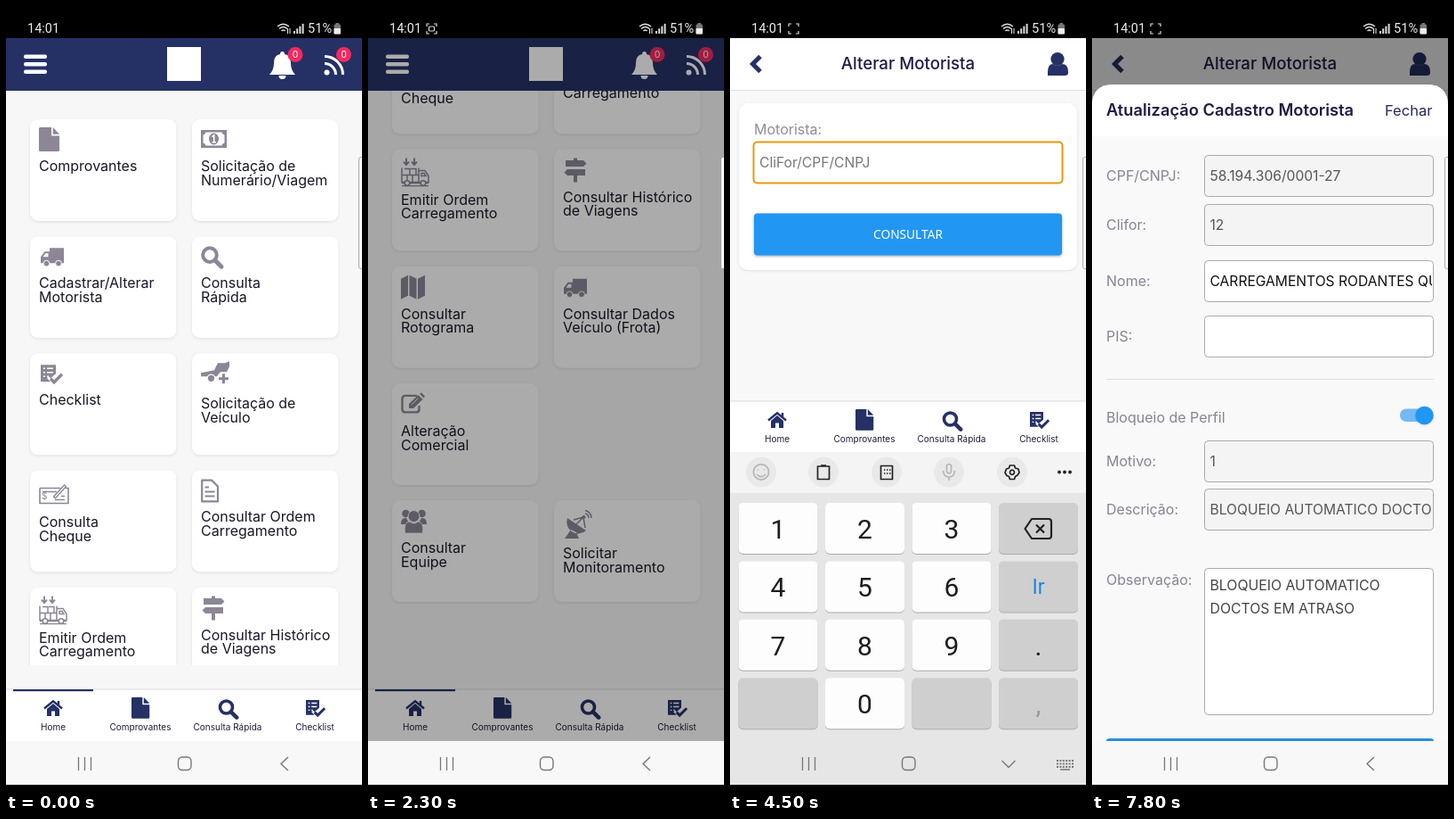
An HTML page that plays this animation: 400x880 px, repeating every 8000 ms.

```html
<!DOCTYPE html>
<html lang="pt-BR">
<head>
<meta charset="utf-8">
<title>Alterar Motorista</title>
<style>
html, body { margin: 0; width: 100%; height: 100%; overflow: hidden; background: #000; }
svg.stage { display: block; width: 100vw; height: 100vh; }
text { font-family: Inter, "Open Sans", sans-serif; white-space: pre; }
.sys { font-family: Roboto, sans-serif; }
.btn { font-family: "Noto Sans", "Open Sans", sans-serif; }
.num { letter-spacing: -.35px; }
.lift { filter: drop-shadow(0 1px 1.5px rgba(0, 0, 0, .1)); }
.key { filter: drop-shadow(0 1px .6px rgba(0, 0, 0, .25)); }
</style>
</head>
<body>
<svg class="stage" id="stage" viewBox="0 0 400 880" preserveAspectRatio="none"></svg>
<script>
const LOOP = 8000, STEP = 100;
const NAVY = '#253165', GREY = '#8c8696', INK = '#191827', BLUE = '#2196f3';

const rect = (x, y, w, h, r, fill, more = '') =>
  `<rect x="${x}" y="${y}" width="${w}" height="${h}" rx="${r}" fill="${fill}" ${more}/>`;
const text = (x, y, str, size, fill, more = '') =>
  `<text x="${x}" y="${y}" font-size="${size}" fill="${fill}" ${more}>${str}</text>`;
const mid = (x, y, str, size, fill, more = '') =>
  text(x, y, str, size, fill, 'text-anchor="middle" ' + more);
const circle = (x, y, r, fill, more = '') =>
  `<circle cx="${x}" cy="${y}" r="${r}" fill="${fill}" ${more}/>`;
const line = (d, color, w, more = '') =>
  `<path d="${d}" fill="none" stroke="${color}" stroke-width="${w}" ${more}/>`;
const group = (id, body, more = '') => `<g id="${id}" ${more}>${body}</g>`;
const CUR = 'currentColor';

const icons = {
  doc: '<path d="M1.5 0H14V9.5H23V25.5Q23 27 21.5 27H1.5Q0 27 0 25.5V1.5Q0 0 1.5 0ZM15.7 0L23 7.7H15.7Z"/>',
  money: '<path fill-rule="evenodd" d="M0 0H29V20H0ZM2.5 5.5V14.5A4 4 0 0 1 5.5 17.5H23.5A4 4 0 0 1 26.5 14.5V5.5A4 4 0 0 1 23.5 2.5H5.5A4 4 0 0 1 2.5 5.5Z"/>' +
    '<ellipse cx="14.5" cy="10" rx="5.5" ry="6.5"/>' + line('M12.5 7.5L14.7 6V13.5M12.5 13.7H17', '#fff', 1.6),
  truck: '<path fill-rule="evenodd" d="M10 0H26V17H0V10L4.5 4H10ZM2.5 10H8.5V6H5.5Z"/>' +
    circle(6.5, 17.5, 3.4, CUR, 'stroke="#fff"') + circle(20, 17.5, 3.4, CUR, 'stroke="#fff"'),
  search: circle(10, 10, 7.8, 'none', `stroke="${CUR}" stroke-width="4"`) + line('M16 16L23 23', CUR, 5, 'stroke-linecap="round"'),
  check: '<path d="M0 0H17V10L11 15L9 13L7 15L11 19H0Z"/>' +
    line('M3 4H5M7 4H14M3 8.5H5M7 8.5H14M3 13H5M7 13H9', '#fff', 1.5) + line('M11 15.5L15 19.5L24 10.5', CUR, 3.4),
  pickup: '<path d="M0 13L15 10L19 2H27L32 0V6L29 12H22Q20 14 18 17H16A5 5 0 0 0 7 17H0Z"/>' + circle(11.5, 19, 3.6, CUR) +
    line('M20 19.5H31M25.5 14V25', CUR, 3),
  cheque: line('M1 5H24M30 5H33V22H1V5M4 9H20M18 18H29M25 14H29', CUR, 1.6) +
    text(3, 18, '$', 10, CUR) + line('M17 16L30 2', CUR, 4) + line('M18 15L29 3', '#fff', 1.2),
  file: line('M1.2 1.2H12L19 8V25H1.2Z', CUR, 2.2, 'stroke-linejoin="round"') + line('M4.5 9H9M4.5 14H15.5M4.5 19H15.5', CUR, 2),
  load: line('M1 11V27H20V11M1 19H20M4 12H10V19M11 12H17V19M7 19V27M13 19V27M20 14H27L31 20V27H20M23 17H26L28 20H23Z', CUR, 1.5) +
    line('M1 31H31M1 28H31', CUR, 1.2) + line('M6 0V7M3 4L6 7.5L9 4M15 0V7M12 4L15 7.5L18 4', CUR, 1.9) +
    [7, 25].map(x => circle(x, 28, 2.8, '#fff', `stroke="${CUR}" stroke-width="1.6"`)).join(''),
  sign: '<path d="M2 2.5H11V0H15V2.5H22L25.5 6L22 9.5H2ZM4 12.5H24V19.5H4L.5 16ZM11 19H15V27H11Z"/>',
  map: '<path d="M0 4L8 0V23L0 27ZM9.5 0L17.5 4V27L9.5 23ZM19 4L27 0V23L19 27Z"/>',
  edit: line('M18 3H5Q1.5 3 1.5 6.5V18Q1.5 21.5 5 21.5H17Q20.5 21.5 20.5 18V14', CUR, 2.4) +
    '<path d="M9 17V12L19.5 2L24.5 7L14 17ZM21 .7L23 -.5L27 3.5L25.5 5.5Z"/>' + line('M12 13L19 6', '#fff', 1),
  users: circle(5.5, 6, 4.3, CUR) + circle(23.5, 6, 4.3, CUR) + '<path d="M0 18Q0 10 6 11L10 18ZM29 18Q29 10 23 11L19 18Z"/>' +
    circle(14.5, 9, 6.5, CUR, 'stroke="#fff"') + '<path d="M4.5 28Q3 15 10 15Q14.5 19 19 15Q26 15 24.5 28Z" stroke="#fff" stroke-width=".8"/>',
  dish: '<path d="M4 8A13 13 0 0 0 25 22ZM8 21L14 24L17 31H1Z"/>' + line('M14 15L22 7M22 7L24 19M11 10L22 7', CUR, 1.5) +
    line('M24 3A5 5 0 0 1 28 8M24 -.5A8.5 8.5 0 0 1 31 8', CUR, 1.4) + circle(22.5, 7, 2, CUR),
  home: '<path d="M3.5 10L10.5 4L17.5 10V18H12.5V12.5H8.5V18H3.5Z"/>' +
    line('M.5 9.5L10.5 1.3L20.5 9.5M16.5 1V6', CUR, 2.4)
};
const icon = (name, x, y, color, k = 1) =>
  `<g transform="translate(${x} ${y}) scale(${k})" fill="${color}" color="${color}">${icons[name]}</g>`;

// column, row, icon, icon offset x/y, text offset, lines
const cards = [
  [0, 0, 'doc', 10, 9, 58, 'Comprovantes'],
  [1, 0, 'money', 10, 12, 58, 'Solicitação de', 'Numerário/Viagem'],
  [0, 1, 'truck', 12, 13, 58, 'Cadastrar/Alterar', 'Motorista'],
  [1, 1, 'search', 10, 11, 58, 'Consulta', 'Rápida'],
  [0, 2, 'check', 12, 13, 58, 'Checklist'],
  [1, 2, 'pickup', 10, 9, 62, 'Solicitação de', 'Veículo'],
  [0, 3, 'cheque', 10, 15, 64, 'Consulta', 'Cheque'],
  [1, 3, 'file', 10, 10, 58, 'Consultar Ordem', 'Carregamento'],
  [0, 4, 'load', 10, 10, 62, 'Emitir Ordem', 'Carregamento'],
  [1, 4, 'sign', 11, 10, 59, 'Consultar Histórico', 'de Viagens'],
  [0, 5, 'map', 10, 10, 59, 'Consultar', 'Rotograma'],
  [1, 5, 'truck', 11, 14, 59, 'Consultar Dados', 'Veículo (Frota)'],
  [0, 6, 'edit', 10, 11, 59, 'Alteração', 'Comercial'],
  [0, 7, 'users', 10, 9, 59, 'Consultar', 'Equipe'],
  [1, 7, 'dish', 11, 12, 65, 'Solicitar', 'Monitoramento']
];
const card = ([col, row, name, ix, iy, ty, ...lines]) => {
  const x = col ? 209 : 27, y = 127 + row * 131.15;
  return rect(x, y, 164.5, 114, 9, '#fff', 'class="lift"') + icon(name, x + ix, y + iy, GREY) +
    lines.map((s, i) => text(x + 10, y + ty + i * 15.7, s, 16, INK)).join('');
};

const badge = x => circle(x, 54.5, 8.5, '#f32b60') + mid(x, 58.3, '0', 10.5, '#fff');
const home = () => rect(0, 36, 400, 788, 0, '#f7f7f8') +
  `<g clip-path="url(#list)">${group('scroll', cards.map(card).join(''))}</g>` +
  rect(0, 36, 400, 59, 0, NAVY) + [54.5, 63, 71.5].map(y => rect(20, y, 26, 4.4, 2, '#fff')).join('') +
  rect(181, 46, 38, 38, 0, '#fff') +
  '<path d="M296 77Q301 72 301 64Q301 55 308 54Q308 51 310.5 51Q313 51 313 54Q320 55 320 64Q320 72 325 77ZM306.5 78H314.5A4 4 0 0 1 306.5 78Z" fill="#fff"/>' +
  circle(360.5, 74.5, 3, '#fff') + line('M358 64.5A12.5 12.5 0 0 1 370.5 77M358 56.5A20.5 20.5 0 0 1 378.5 77', '#fff', 3) +
  badge(325) + badge(379.5);

const page = () => rect(0, 36, 400, 788, 0, '#f8f8f8') + rect(0, 36, 400, 59, 0, '#fff') + rect(0, 94, 400, 1, 0, '#dedede') +
  line('M34 56.5L25.5 65L34 73.5', NAVY, 5) + mid(200, 71, 'Alterar Motorista', 18.7, '#211b45', 'font-weight="500"') +
  '<path d="M357 78V74Q357 65 363 65Q368 69 373 65Q380 65 380 74V75Q380 78 376 78Z" fill="' + NAVY + '"/>' + circle(368, 59.5, 7.6, NAVY) +
  rect(10, 109, 380, 187, 10, '#fff', 'class="lift"') + text(27, 144, 'Motorista:', 16, '#918b98') +
  rect(26.5, 152.5, 347, 46, 4, '#fff', 'id="field"') +
  text(33, 181, 'CliFor/CPF/CNPJ', 15.6, '#777', 'id="hint"') +
  text(33, 181, '58194306000127', 15, '#111', 'id="value" class="num"') +
  rect(0, 165, 1.2, 22, 0, '#111', 'id="caret"') +
  rect(27, 232.5, 346, 47, 4, BLUE, 'style="filter:drop-shadow(0 1.5px 1.5px rgba(0,0,0,.35))"') +
  `<g clip-path="url(#button)">${circle(201, 256, 0, '#fff', 'id="ripple"')}</g>` +
  mid(200, 261, 'CONSULTAR', 13.7, '#fff', 'class="btn"');

const tabs = () => rect(0, 766, 400, 58, 0, '#fff') + rect(0, 765.5, 400, 1, 0, '#dcdcdc') +
  rect(8, 766, 90, 2.2, 0, NAVY, 'id="active"') +
  icon('home', 42.5, 778, NAVY) + icon('doc', 141, 775, NAVY, .88) + icon('search', 238.5, 777, NAVY, .9) + icon('check', 337, 778, NAVY, .88) +
  ['Home', 'Comprovantes', 'Consulta Rápida', 'Checklist'].map((s, i) => mid(53 + i * 98, 811.5, s, 10, '#1d1d35')).join('');

const keyLabels = ['1', '2', '3', '', '4', '5', '6', 'Ir', '7', '8', '9', '.', '', '0', '', ','];
const keyboard = () => {
  const key = (s, i) => {
    const x = 9.5 + (i % 4) * 97.5, y = 557 + Math.floor(i / 4) * 65.4, digit = /\d/.test(s);
    const fill = s === 'Ir' ? '#1785e2' : s === ',' ? '#999' : '#1c1c1c';
    return rect(x, y, 89, 57, 5, digit ? '#fdfdfd' : '#cfcfd0', 'class="key"') +
      mid(x + 44.5, y + (s === 'Ir' ? 37 : 40), s, s === 'Ir' ? 23 : 30, fill, 'class="sys"');
  };
  const tool = (x, c) => line({
    35: 'M30 525Q35 530 40 525M31.5 519.5V520.5M38.5 519.5V520.5M43.5 522.5A8.5 8.5 0 1 1 43.5 522.4',
    105: 'M98.5 516H111.5V530.5H98.5ZM102 515H108',
    176: 'M169.5 515.5H182.5V530.5H169.5ZM173 520H174.5M176 520H177.5M179 520H180.5M173 524H174.5M176 524H177.5M179 524H180.5',
    246: 'M243.5 515Q246 512 248.5 515V522Q246 526 243.5 522ZM239.5 521Q240 528 246 528Q252 528 252.5 521M246 528V532',
    317: 'M314.5 515H319.5L320.5 518L324 519L325 523L323 526L320.5 527.5L319.5 530.5H314.5L313.5 527.5L311 526.5L309 523L310.5 519L313.5 518ZM319.5 522.8A2.5 2.5 0 1 1 319.5 522.7'
  }[x], c, 1.7, 'stroke-linejoin="round"');
  return rect(0, 500, 400, 380, 0, '#e6e6e7') + rect(0, 500, 400, 46, 0, '#f4f4f4') +
    [35, 105, 176, 246, 317].map(x => circle(x, 522.5, 17, '#e9e9e9') + tool(x, x === 35 || x === 246 ? '#b5b5b5' : '#222')).join('') +
    [370, 376, 382].map(x => circle(x, 522.5, 1.9, '#222')).join('') + keyLabels.map(key).join('') +
    line('M339 575H358Q361 575 361 578V594Q361 597 358 597H339L331.5 586ZM344 581.5L353 590.5M353 581.5L344 590.5', '#222', 2.2, 'stroke-linejoin="round"');
};

const popup = () => rect(118, 115, 111, 49.5, 9, '#393939', 'style="filter:drop-shadow(0 1px 2px rgba(0,0,0,.35))"') +
  '<path d="M180 115H220Q229 115 229 124V155.5Q229 164.5 220 164.5H180Z" fill="#222"/>' +
  mid(152, 145, 'Colar', 15, '#fff', 'class="sys"') + [133.5, 139.7, 146].map(y => circle(205, y, 2.1, '#fff')).join('');

// label, top, value, locked
const fields = [
  ['CPF/CNPJ:', 167.5, '58.194.306/0001-27', 1], ['Clifor:', 222.5, '12', 1],
  ['Nome:', 285.5, 'CARREGAMENTOS RODANTES QUILVOR', 0], ['PIS:', 347.5, '', 0],
  ['Motivo:', 487.5, '1', 1], ['Descrição:', 541.5, 'BLOQUEIO AUTOMATICO DOCTOS EM ATRASO', 1]
];
const modal = () => {
  const label = (y, s) => text(16, y, s, 16, '#898295');
  const box = (y, h, locked) => rect(126.5, y, 257, h, 4, locked ? '#f4f4f4' : '#fff', 'stroke="#aaa"');
  return '<path d="M0 824V112Q0 88 24 88H376Q400 88 400 112V824Z" fill="#f9f9f9"/>' +
    '<path d="M0 146V112Q0 88 24 88H376Q400 88 400 112V146Z" fill="#fff"/>' +
    text(16, 123, 'Atualização Cadastro Motorista', 18.3, '#211b45', 'font-weight="600"') + text(329, 122.5, 'Fechar', 16.5, '#2a2a5a') +
    fields.map(([s, y, v, locked]) => label(y + 28.5, s) + box(y, 46, locked) +
      `<svg x="128" y="${y}" width="254" height="46">${text(4.5, 28.5, v, 15.6, locked ? '#555' : '#111')}</svg>`).join('') +
    rect(16, 418, 368, 1, 0, '#dedede') + label(466.5, 'Bloqueio de Perfil') +
    rect(346, 451.5, 36, 14.5, 7.2, '#74b9f4') + circle(373.5, 459, 10.3, BLUE, 'class="lift"') +
    label(649, 'Observação:') + box(630.5, 164, 0) +
    text(132.5, 655, 'BLOQUEIO AUTOMATICO', 15.8, '#444') + text(132.5, 680.5, 'DOCTOS EM ATRASO', 15.8, '#444') +
    '<path d="M16 824Q16 821 20 821H380Q384 821 384 824Z" fill="#2b8fd6"/>';
};

const status = () => rect(0, 0, 400, 36, 0, '#000') + text(24, 30, '14:01', 14.5, '#eee', 'class="sys"') +
  group('rec', line('M66 23V20H69M74 20H77V23M77 28V31H74M69 31H66V28', '#ddd', 1.2) +
    group('lens', rect(68.5, 23, 6, 5, 1, 'none', 'stroke="#ddd" stroke-width="1.2"'))) +
  line('M305 23Q311.5 17.5 318 23M307 25.5Q311.5 21.5 316 25.5M309.5 28Q311.5 26 313.5 28', '#ddd', 1.5) +
  line('M316.5 25V31M319 31V25', '#ddd', 1.1) +
  [0, 1, 2, 3].map(i => rect(323 + i * 3.2, 28 - i * 2.7, 2, 3 + i * 2.7, 0, '#ddd')).join('') +
  text(339, 30.3, '51%', 14.6, '#eee', 'class="sys"') +
  rect(368.5, 20.5, 7.5, 11, 1.2, '#777') + rect(368.5, 25, 7.5, 6.5, 1, '#eee') + rect(370.5, 19, 3.5, 2, 0, '#777');

const nav = () => line('M81.5 842V857M88.5 842V857M95.5 842V857', '#777', 1.3) +
  rect(193.5, 842, 14.5, 14.5, 4.5, 'none', 'stroke="#777" stroke-width="1.4"') +
  line('M317 842L309 849.5L317 857', '#777', 1.4, 'id="back"') +
  group('hide', line('M305.5 846L313 853.5L320.5 846', '#777', 1.4) +
    line('M367 846H386M367 849.5H386M367 853H386', '#777', 1.8, 'stroke-dasharray="2 1.4"') + line('M371 856H382', '#777', 1.5));

const stage = document.getElementById('stage');
stage.innerHTML = '<defs><clipPath id="list"><rect x="0" y="95" width="400" height="644"/></clipPath>' +
  '<clipPath id="button"><rect x="27" y="232.5" width="346" height="47" rx="4"/></clipPath></defs>' +
  home() + group('page', page()) + group('tabs', tabs()) + group('popup', popup()) +
  rect(0, 36, 400, 788, 0, '#000', 'id="dim"') +
  line('M182 465H215', '#8a8a8a', 1.5, 'id="wait" stroke-dasharray="5 2"') + group('modal', modal()) +
  rect(0, 824, 400, 56, 0, '#f8f8f8') + group('keyboard', keyboard()) + nav() +
  '<path d="M401 169.5H398.5Q396.5 169.5 396.5 172V292Q396.5 294.5 398.5 294.5H401Z" fill="#f8f8f8" stroke="#999" stroke-width=".8"/>' +
  status() + rect(0, 873, 400, 7, 0, '#000');

const el = {};
stage.querySelectorAll('[id]').forEach(n => el[n.id] = n);
const set = (id, key, v) => el[id].setAttribute(key, v);
const show = (id, on) => set(id, 'opacity', +on);
const shift = (id, y) => set(id, 'transform', `translate(0 ${y})`);
const clamp = v => Math.max(0, Math.min(1, v));
const out = (t, a, b) => 1 - (1 - clamp((t - a) / (b - a))) ** 3;
const within = (t, a, b) => t >= a && t < b;
const track = (t, keys) => keys.reduce((v, [at, to], i) => {
  if (t < at) return v;
  const next = keys[i + 1];
  return next ? to + (next[1] - to) * clamp((t - at) / (next[0] - at)) : to;
}, keys[0][1]);

function draw(time) {
  const t = Math.floor(time / STEP) * STEP;
  shift('scroll', -491 * out(t, 100, 700));

  const p = out(t, 2600, 3300);
  show('page', p);
  shift('page', 40 * (1 - p));
  show('active', 1 - p);

  const kb = out(t, 3600, 3900) * (1 - out(t, 6200, 6500));
  shift('keyboard', 380 * (1 - kb));
  shift('tabs', -323 * kb);
  show('hide', kb > .5);
  show('back', kb <= .5);

  const focus = within(t, 3700, 6400), pasted = t >= 5500;
  set('field', 'stroke', focus ? '#e59a0c' : '#a5a5a5');
  set('field', 'stroke-width', focus ? 2 : 1);
  show('hint', !pasted);
  show('value', pasted);
  set('caret', 'x', pasted ? 155 : 33);
  show('caret', focus && (within(t, 5500, 6000) || Math.floor((t - 3700) / 500) % 2 === 0));
  show('popup', track(t, [[5100, 0], [5300, 1], [5900, 1], [6100, 0]]));

  set('ripple', 'r', track(t, [[6400, 0], [6600, 126], [6700, 180]]));
  set('ripple', 'opacity', track(t, [[6400, .22], [6700, .22], [6900, 0]]));
  set('dim', 'opacity', track(t, [[1100, 0], [1200, .1], [1500, .38], [2100, .38], [2300, .33],
    [2500, 0], [6400, 0], [6500, .2], [6600, .39], [7100, .39], [7500, .46]]));
  show('wait', within(t, 6600, 7100) * .4);
  shift('modal', 740 * (1 - out(t, 7100, 7500)));

  show('rec', t >= 300);
  show('lens', !(within(t, 4300, 4700) || within(t, 5700, 6300) || t >= 7800));
}

const start = performance.now();
(function tick() {
  draw((performance.now() - start) % LOOP);
  requestAnimationFrame(tick);
})();
</script>
</body>
</html>
```
